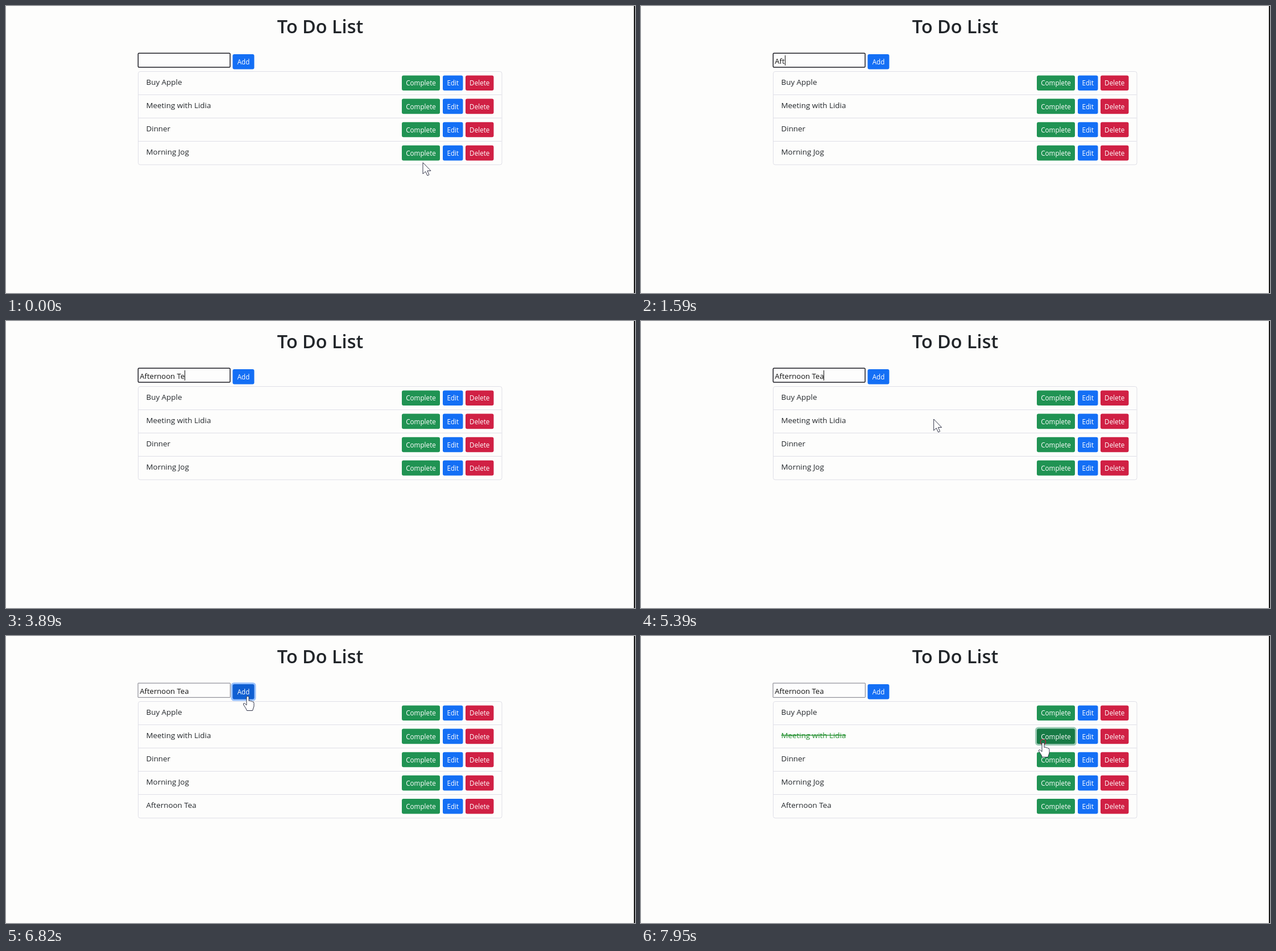
An HTML page for the animation above (7990 ms loop, 1106x506 px).

```html
<!DOCTYPE html>
<html lang="en">
<head>
<meta charset="utf-8">
<title>To Do List</title>
<style>
  html, body { margin: 0; width: 1106px; height: 506px; overflow: hidden; background: #fdfdfc; }
  svg { display: block; }
  text { font: 13.4px "Open Sans", "Noto Sans", sans-serif; fill: #24282c; white-space: pre; }
  .title { font-size: 32.4px; font-weight: 600; text-anchor: middle; fill: #212529; }
  .label { font-size: 11.7px; fill: #fff; text-anchor: middle; }
  .field { font-size: 13.1px; fill: #111; }
  .done { fill: #249030; text-decoration: line-through; }
  .line { fill: none; stroke: #dfdfe7; }
</style>
</head>
<body>
<svg id="stage" width="1106" height="506"></svg>
<script>
const LOOP = 7990, ROW = 41.1, LIST_TOP = 115.5;
const ENTRY = "Afternoon Tea";
const KEY_TIMES = [1080, 1330, 1560, 1720, 2010, 2300, 2540, 2820, 3030, 3420, 3640, 3890, 4100];
const ADD = { down: 5780, up: 5850 }, DONE = { down: 7830, up: 7900 };
const HIDE = 400, SHOW = 5030;
const PATH = [[0, 733, 276], [40, 733, 276], [400, 640, 268], [5030, 640, 268],
  [5680, 425, 105], [6300, 425, 106], [7050, 425, 106], [7480, 708, 189], [7800, 707, 188]];
const COLORS = {
  blue: ["#146ff5", "#0f5fd2", "#0d6efd"],
  green: ["#209353", "#177a45", "#198754"],
  red: ["#d02044", "#b31b3a", "#dc3545"]
};
const ARROW = "M0 0V20L4.6 15.8L8 23L11 21.6L7.8 14.6H14Z";
const HAND = "M-2 1.5Q0-1.5 2 1.5V8.5Q4 7 5.5 9Q7.5 8 8.5 10Q11 9.5 11 12.5V18L8.5 25.5H-1.5"
  + "L-3 22L-7.5 15Q-8 12-5.5 12.5L-2 16Z";

const stage = document.getElementById("stage");
const buttons = [];

function draw(tag, attrs, parent = stage, text) {
  const el = document.createElementNS("http://www.w3.org/2000/svg", tag);
  set(el, attrs);
  if (text) el.textContent = text;
  return parent.appendChild(el);
}

function set(el, attrs) {
  for (const name in attrs) el.setAttribute(name, attrs[name]);
}

function show(el, on) {
  el.style.display = on ? "" : "none";
}

function addButton(label, color, x, y, w, parent) {
  const h = 26.6;
  const halo = draw("rect", { x: x - 3, y: y - 3, width: w + 6, height: h + 6, rx: 5.5,
    fill: COLORS[color][2], opacity: 0 }, parent);
  const face = draw("rect", { x, y, width: w, height: h, rx: 3 }, parent);
  draw("text", { class: "label", x: x + w / 2, y: y + 17.9 }, parent, label);
  const button = { x, y, w, h, color, halo, face };
  buttons.push(button);
  return button;
}

function addRow(name, i) {
  const g = draw("g", {}), y = LIST_TOP + i * ROW;
  if (i) draw("path", { class: "line", d: `M232.5 ${Math.floor(y) + 0.5}H871.5` }, g);
  const text = draw("text", { x: 246.5, y: y + 23 }, g, name);
  const complete = addButton("Complete", "green", 696, y + 7, 67, g);
  addButton("Edit", "blue", 768, y + 7, 35.5, g);
  addButton("Delete", "red", 808, y + 7, 49.5, g);
  return { g, text, complete };
}

draw("rect", { x: 1104, y: 0, width: 2, height: 506, fill: "#151515" });
draw("text", { class: "title", x: 552.5, y: 48.3 }, stage, "To Do List");
const box = draw("rect", { fill: "#fdfdfd" });
const field = draw("text", { class: "field", x: 235.2, y: 101.6 });
const caret = draw("rect", { y: 87, width: 1, height: 18, fill: "#111" });
const addBtn = addButton("Add", "blue", 398.5, 85, 38, stage);
const list = draw("rect", { class: "line", x: 232.5, y: LIST_TOP, width: 639.5, rx: 3.5 });
const rows = ["Buy Apple", "Meeting with Lidia", "Dinner", "Morning Jog", ENTRY].map(addRow);
const ripple = draw("circle", { fill: "none", stroke: "#b3203f", "stroke-width": 1.4 });
const pointer = draw("path", { fill: "#fff", stroke: "#33364a", "stroke-linejoin": "round" });

const clamp = v => Math.min(1, Math.max(0, v));

function pointerAt(t) {
  let i = 1;
  while (i < PATH.length - 1 && t > PATH[i][0]) i++;
  const [t0, x0, y0] = PATH[i - 1], [t1, x1, y1] = PATH[i];
  const p = clamp((t - t0) / (t1 - t0)), e = p * p * (3 - 2 * p);
  return [x0 + (x1 - x0) * e, y0 + (y1 - y0) * e];
}

function caretOn(t, typed) {
  // Blinking restarts with every key press.
  const start = typed ? KEY_TIMES[typed - 1] : 500;
  return t < ADD.down && t >= start && (t - start) % 1000 < 500;
}

function render(t) {
  const typed = KEY_TIMES.filter(k => k <= t).length;
  const focused = t < ADD.down;
  const edge = focused ? 1.5 : 1;
  field.textContent = ENTRY.slice(0, typed);
  set(box, { x: 231.6 + edge / 2, y: 82.6 + edge / 2, width: 163.2 - edge, height: 26.2 - edge,
    rx: focused ? 1.5 : 0.5, stroke: focused ? "#1c1c24" : "#777783", "stroke-width": edge });
  set(caret, { x: Math.round(235.2 + (typed ? field.getComputedTextLength() : 0)) });
  show(caret, caretOn(t, typed));

  const added = t >= ADD.up, struck = t >= DONE.up;
  show(rows[4].g, added);
  set(list, { height: ROW * (added ? 5 : 4) });
  rows[1].text.setAttribute("class", struck ? "done" : "");

  const [x, y] = pointerAt(t), visible = t < HIDE || t >= SHOW;
  const over = visible && buttons.find(b => x >= b.x && x <= b.x + b.w && y >= b.y && y <= b.y + b.h);
  const active = t >= DONE.down ? rows[1].complete : t >= ADD.down ? addBtn : null;
  const since = t - (t >= DONE.down ? DONE.down : ADD.down);
  for (const b of buttons) {
    set(b.face, { fill: COLORS[b.color][b === over || b === active ? 1 : 0] });
    set(b.halo, { opacity: b === active ? 0.42 * clamp(since / 100) : 0 });
  }

  show(ripple, since >= 0 && since < 700);
  set(ripple, { cx: x, cy: y - 1, r: Math.max(0, 1.5 + since * 0.026), opacity: clamp((700 - since) / 300) });
  show(pointer, visible);
  set(pointer, { d: over ? HAND : ARROW, transform: `translate(${x} ${y})` });
}

function tick(now) {
  render(now % LOOP);
  requestAnimationFrame(tick);
}
render(0);
requestAnimationFrame(tick);
</script>
</body>
</html>
```
